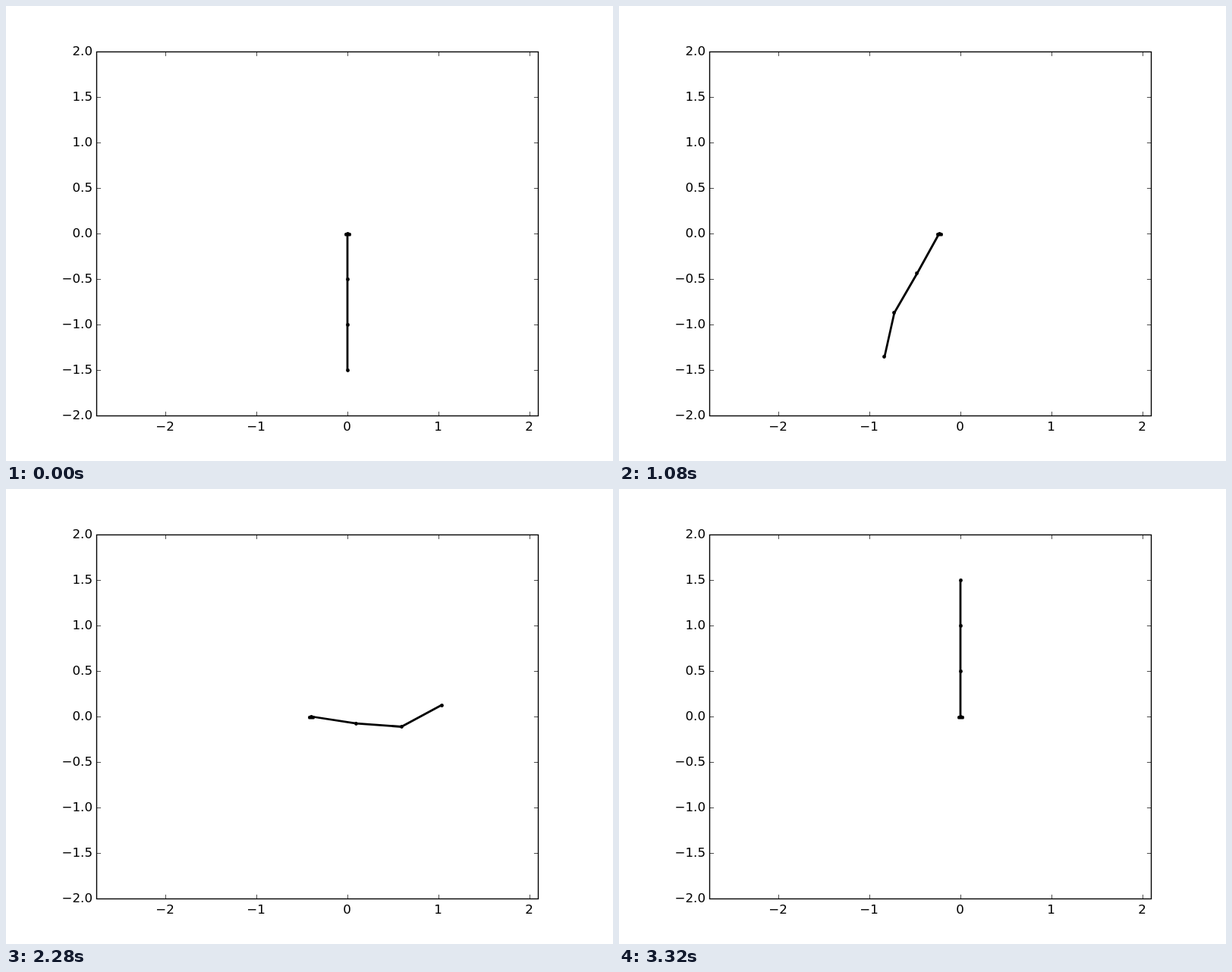
An HTML page that plays this animation: 800 by 600 pixels, repeating every 3.36 s.

```html
<!DOCTYPE html>
<html lang="en">
<head>
<meta charset="utf-8">
<title>Triple pendulum swing-up</title>
<style>
  html, body { margin: 0; width: 100%; height: 100%; overflow: hidden; background: #fff; }
  svg { display: block; }
  text { font: 16.67px "DejaVu Sans", sans-serif; }
</style>
</head>
<body>
<svg width="800" height="600" viewBox="0 0 800 600">
  <g id="axes">
    <rect x="119.5" y="60.5" width="582" height="480" fill="none" stroke="#000" stroke-width="1.39"/>
  </g>
  <g id="pendulum">
    <polyline id="links" fill="none" stroke="#000" stroke-width="2.78" stroke-linejoin="round"/>
    <rect id="cart" y="299" width="8.8" height="4.5" rx="1.6"/>
  </g>
</svg>
<script>
const LOOP = 3360, STEP = 40, UNIT = 120, LINK = 60, X0 = 450, Y0 = 300;
const byId = id => document.getElementById(id);

function add(parent, tag, attrs, text = '') {
  const el = document.createElementNS('http://www.w3.org/2000/svg', tag);
  for (const k in attrs) el.setAttribute(k, attrs[k]);
  el.textContent = text;
  return parent.appendChild(el);
}

// Ticks and labels
const axes = byId('axes');
const tick = d => add(axes, 'path', { d, stroke: '#000', 'stroke-width': 0.7 });
const label = (x, y, anchor, value) =>
  add(axes, 'text', { x, y, 'text-anchor': anchor }, value.replace('-', '\u2212'));

for (let v = -2; v <= 2; v++) {
  const x = X0 + v * UNIT + .5;
  tick(`M${x} 60.5v5.6M${x} 540.5v-5.6`);
  label(x - 1, 560, 'middle', String(v));
}
for (let v = -2; v <= 2; v += .5) {
  const y = Y0 - v * UNIT + .5;
  tick(`M119.5 ${y}h5.6M701.5 ${y}h-5.6`);
  label(114, y + 4.5, 'end', v.toFixed(1));
}

// Key poses: time in ms, cart x in px, three link angles from hanging down
const keys = [
  [0, X0, 0, 0, 0],
  [320, 428, .22, .1, .04],
  [640, 394.5, -.017, .374, .396],
  [1080, 422, -.505, -.525, -.219],
  [1280, 448, -.565, -.71, -1.05],
  [1560, 492, -.27, -.595, -1.704],
  [1840, 522, -.15, -.26, .12],
  [2120, 465, .9, 1.06, 1.6],
  [2280, 402, 1.42, 1.496, 2.064],
  [2520, 301, 2.32, 1.85, 2.46],
  [2680, 337, 2.618, 2.094, 2.656],
  [3000, 466, 3.14, 3.13, 3.09],
  [3320, X0, Math.PI, Math.PI, Math.PI]
];

// Slope at key i of column c; the motion starts and ends at rest
function slope(i, c) {
  if (i === 0 || i === keys.length - 1) return 0;
  const [a, b, d] = [keys[i - 1], keys[i], keys[i + 1]];
  const h0 = b[0] - a[0], h1 = d[0] - b[0];
  return ((b[c] - a[c]) / h0 * h1 + (d[c] - b[c]) / h1 * h0) / (h0 + h1);
}

// Cubic Hermite interpolation of all columns
function pose(t) {
  let i = 0;
  while (i < keys.length - 2 && t >= keys[i + 1][0]) i++;
  const a = keys[i], b = keys[i + 1], h = b[0] - a[0];
  const s = (t - a[0]) / h, r = 1 - s;
  return [1, 2, 3, 4].map(c =>
    r * r * (1 + 2 * s) * a[c] + s * s * (3 - 2 * s) * b[c] +
    h * s * r * (r * slope(i, c) - s * slope(i + 1, c)));
}

const pendulum = byId('pendulum'), links = byId('links'), cart = byId('cart');
const dots = [0, 1, 2, 3].map(() => add(pendulum, 'circle', { r: 2.4 }));
const pixelCentre = v => Math.floor(v) + .5;

function draw() {
  const t = Math.floor(performance.now() % LOOP / STEP) * STEP;
  const [cartX, ...angles] = pose(t);
  let x = cartX, y = Y0;
  const points = [[x, y]];
  for (const a of angles) {
    x += LINK * Math.sin(a);
    y += LINK * Math.cos(a);
    points.push([x, y]);
  }
  links.setAttribute('points', points.join(' '));
  cart.setAttribute('x', cartX - 3.9);
  dots.forEach((dot, i) => {
    dot.setAttribute('cx', pixelCentre(points[i][0]));
    dot.setAttribute('cy', pixelCentre(points[i][1]));
  });
  requestAnimationFrame(draw);
}
draw();
</script>
</body>
</html>
```
